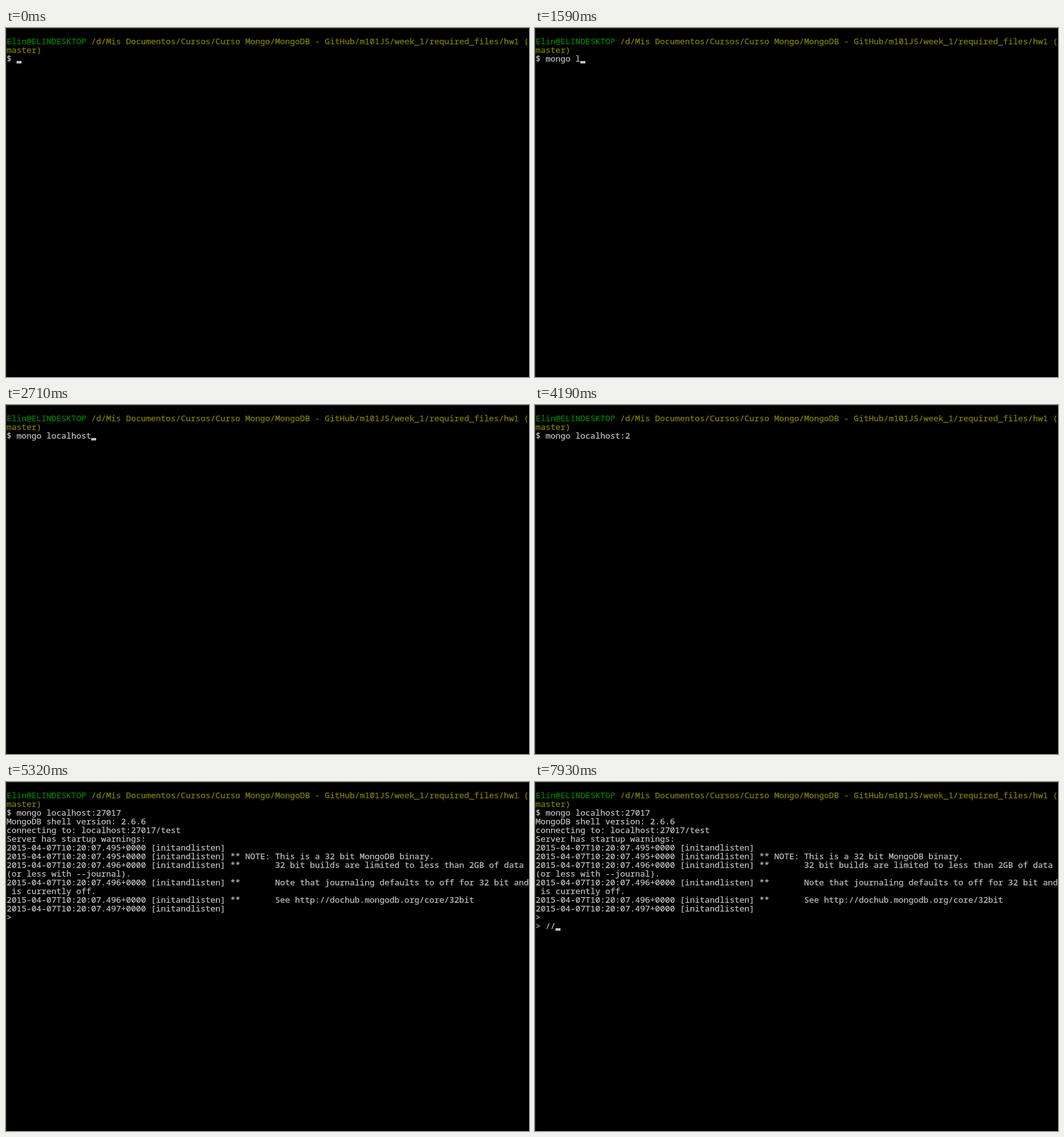
An HTML page that plays this animation: 841 px wide and 561 px high, repeating every 8 s.

```html
<!DOCTYPE html>
<html lang="en">
<head>
<meta charset="utf-8">
<title>Terminal session</title>
<style>
  html, body { margin: 0; width: 100%; height: 100%; overflow: hidden; background: #000; }
  #screen { position: relative; width: 841px; height: 561px; overflow: hidden; }
  #screen::after { content: ""; position: absolute; inset: 0; border: solid #222; border-width: 1px 0 0 1px; }
  pre {
    position: absolute; left: 1px; top: 14px; margin: 0; color: #c0c0c0;
    font: 13.3333px/14px "Noto Sans Mono", "DejaVu Sans Mono", monospace;
    font-variant-ligatures: none;
    -webkit-text-stroke: 0.25px currentColor;
  }
  .user { color: #008000; }
  .path { color: #808000; }
  #cursor { position: absolute; width: 8px; height: 4px; background: #c0c0c0; }
</style>
</head>
<body>
<div id="screen">
<pre><span class="user">Elin@ELINDESKTOP</span> <span class="path">/d/Mis Documentos/Cursos/Curso Mongo/MongoDB - GitHub/m101JS/week_1/required_files/hw1 (
master)</span>
<span id="session"></span></pre>
<div id="cursor"></div>
</div>
<script>
const LOOP = 8000, CELL = 8, LINE = 14, PROMPT_ROW = 3;
const session = document.getElementById("session");
const cursor = document.getElementById("cursor");

const log = (ms, text = "") => `2015-04-07T10:20:07.${ms}+0000 [initandlisten] ${text}`;
const indent = " ".repeat(7);
const output = [
  "",
  "MongoDB shell version: 2.6.6",
  "connecting to: localhost:27017/test",
  "Server has startup warnings:",
  log(495),
  log(495, "** NOTE: This is a 32 bit MongoDB binary."),
  log(496, `**${indent}32 bit builds are limited to less than 2GB of data`),
  "(or less with --journal).",
  log(496, `**${indent}Note that journaling defaults to off for 32 bit and`),
  " is currently off.",
  log(496, `**${indent}See http://dochub.mongodb.org/core/32bit`),
  log(497),
  "> "
].join("\n");

// Bursts of text: start time, characters, delay per character (0 = all at once).
const bursts = [
  [0, "$ ", 0],
  [340, "mo", 0],
  [580, "n", 0],
  [790, "go ", 110],
  [1590, "l", 0],
  [1830, "ocal", 70],
  [2250, "hos", 110],
  [2710, "t:", 370],
  [4190, "27", 110],
  [4520, "017", 230],
  [5320, output, 0],
  [5920, "\n> ", 0],
  [6720, "//", 130]
];

// The cursor starts visible and flips at each of these times.
const blinks = [580, 790, 1130, 1590, 2140, 2250, 3200, 3700, 4190, 4300, 5320, 7930];

function typed(t, [start, text, delay]) {
  if (t < start) return "";
  return delay ? text.slice(0, Math.floor((t - start) / delay) + 1) : text;
}

function draw(t) {
  const text = bursts.map(burst => typed(t, burst)).join("");
  const lines = text.split("\n");
  if (session.textContent !== text) session.textContent = text;
  cursor.style.left = 1 + CELL * lines.at(-1).length + "px";
  cursor.style.top = LINE * (PROMPT_ROW + lines.length) - 3 + "px";
  cursor.hidden = blinks.filter(time => time <= t).length % 2 === 1;
}

const start = performance.now();
function tick() {
  draw((performance.now() - start) % LOOP);
  requestAnimationFrame(tick);
}
tick();
</script>
</body>
</html>
```
